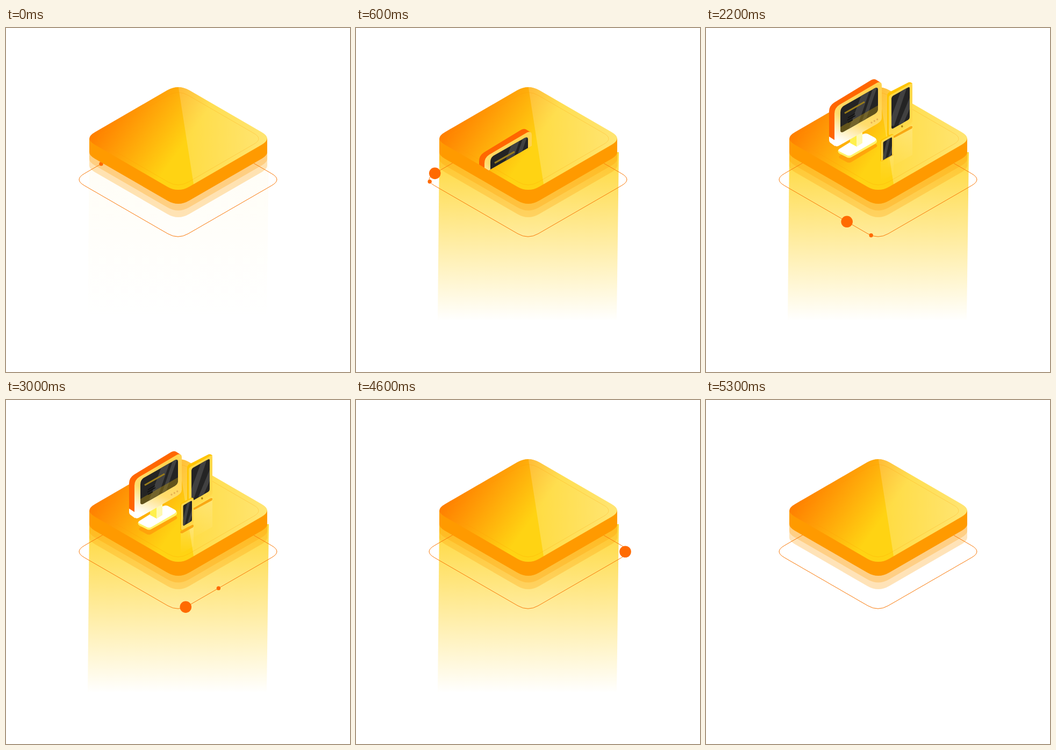
An HTML page for the animation above (5.5 s loop, 640 by 640 pixels).

```html
<!DOCTYPE html>
<html lang="en">
<head>
<meta charset="utf-8">
<title>Devices on a platform</title>
<style>
html, body { margin: 0; width: 100%; height: 100%; overflow: hidden; background: #fff; }
svg { display: block; width: 100vw; height: 100vh; }
</style>
</head>
<body>
<svg viewBox="0 0 640 640" xmlns="http://www.w3.org/2000/svg">
  <defs>
    <linearGradient id="glowFill" gradientUnits="userSpaceOnUse" x1="0" y1="231" x2="0" y2="545">
      <stop offset="0" stop-color="#ffd83a"/>
      <stop offset="1" stop-color="#ffd83a" stop-opacity="0"/>
    </linearGradient>
    <linearGradient id="topFill" gradientUnits="userSpaceOnUse" x1="190" y1="160" x2="310" y2="245">
      <stop offset="0" stop-color="#ff8000"/>
      <stop offset="1" stop-color="#ffd313"/>
    </linearGradient>
    <linearGradient id="shineFill" gradientUnits="userSpaceOnUse" x1="325" y1="0" x2="480" y2="0">
      <stop offset="0" stop-color="#fff" stop-opacity=".19"/>
      <stop offset="1" stop-color="#fff" stop-opacity=".4"/>
    </linearGradient>
    <linearGradient id="frameFill" gradientUnits="userSpaceOnUse" x1="300" y1="120" x2="262" y2="216">
      <stop offset="0" stop-color="#ffd350"/>
      <stop offset=".55" stop-color="#ffdc6c"/>
      <stop offset="1" stop-color="#fff"/>
    </linearGradient>
    <linearGradient id="mirrorFill" x1="0" y1="0" x2="0" y2="1">
      <stop offset="0" stop-color="#fff" stop-opacity=".2"/>
      <stop offset="1" stop-color="#fff" stop-opacity="0"/>
    </linearGradient>
    <clipPath id="topClip"><path class="top"/></clipPath>
    <clipPath id="monitorClip"><path d="M200 60H350V206L247 265 229 254H200Z"/></clipPath>
    <clipPath id="tabletClip"><path d="M330 70H390V175L337 204H330Z"/></clipPath>
    <clipPath id="phoneClip"><path d="M318 160H356V231L325 248H318Z"/></clipPath>
    <clipPath id="monitorGlass"><path id="glassM" d="M250 157Q250 149 256 145L314 112Q320 109 320 115V151Q320 156 314 160L256 193Q250 196 250 190Z"/></clipPath>
    <clipPath id="tabletGlass"><path id="glassT" d="M345 131Q345 128 348 126L376 110.500Q379 109 379 112V166Q379 169 376 171L348 187Q345 188 345 185Z"/></clipPath>
    <clipPath id="phoneGlass"><path id="glassP" d="M329.500 198Q329.500 196 331.500 195L344 188Q346 187 346 189V223Q346 225 344 226L331.500 233.500Q329.500 234.500 329.500 232Z"/></clipPath>
    <path id="body" d="M155 205.500V231Q155 237 165 243L300 321Q320.500 333 341 321L476 243Q486 237 486 231V205.500L320 130Z"/>
  </defs>

  <path id="glow" d="M155 231H489L485 545H152Z" fill="url(#glowFill)"/>
  <g fill="#f90">
    <use href="#body" y="25" opacity=".28"/>
    <use href="#body" y="12.500" opacity=".28"/>
  </g>
  <path id="ring" fill="none" stroke="#f97a0a"/>
  <circle id="small" r="3.700" fill="#ff6a00"/>
  <circle id="big" r="10.800" fill="#ff6a00"/>

  <use href="#body" fill="#ff9a00"/>
  <path class="top" fill="url(#topFill)"/>
  <path d="M320 105L350.500 300 500 215V190Z" fill="url(#shineFill)" clip-path="url(#topClip)"/>
  <path id="inner" fill="none" stroke="#f90" stroke-width=".8" opacity=".35"/>

  <g id="tabletBase">
    <path d="M338 206L384 180V236L338 262Z" fill="url(#mirrorFill)"/>
    <path d="M347 202L380 183Q384 181 384 184T381 188L353 203Q347 206 347 202Z" fill="#f9a813"/>
  </g>
  <g clip-path="url(#tabletClip)"><g id="tablet">
    <path d="M337 125Q337 122 340 120L377 101Q380 100 384 103L360 150 345 202Q337 205 337 198Z" fill="#ffc400"/>
    <path d="M340 130Q340 126 344 124L380 104Q384 102 384 106V172Q384 176 380 178L345 198Q340 201 340 196Z" fill="#ffd84a"/>
    <use href="#glassT" fill="#242424"/>
    <path d="M363 116L374 110 350 182H339ZM381 125V146L366 180H358Z" fill="#414141" clip-path="url(#tabletGlass)"/>
    <ellipse cx="364.800" cy="183" rx="1.700" ry="2" fill="#a8800c"/>
  </g></g>

  <g id="monitorBase">
    <path d="M248 238L298 208 316 216Q321 219 316 222L271 249Q266 252 261 249L250 243Q246 241 248 238Z" fill="#ff9d0a" opacity=".8"/>
  </g>
  <g clip-path="url(#monitorClip)"><g id="monitor">
    <path d="M248 226L291 199Q296 196 301 198L314 205Q318 207 318 209V212Q317 214 314 216L271 240Q266 243 261 240L249 234Q245 232 245.500 228Z" fill="#fff36a"/>
    <path d="M248 225L291 198Q296 195 301 197L314 204Q319 207 314 211L271 236Q266 239 261 236L249 230Q244 228 248 225Z" fill="#fff"/>
    <path d="M268 200L281 196V221L268 214Z" fill="#fff04d"/>
    <path d="M280 196L291 188V214L280 221Z" fill="#fff9b0"/>
    <path d="M229 155Q229 145 238 139L307 97Q312 94 316 96L324 101 260 150 241 220 232 212Q229 210 229 207Z" fill="#f60"/>
    <path d="M229 202L240 209V220L232 214Q229 212 229 208Z" fill="#fff"/>
    <path d="M239 159Q239 149 248 143L318 102Q327 98 327 107V167Q327 173 319 178L249 218Q239 224 239 214Z" fill="url(#frameFill)"/>
    <use href="#glassM" fill="#242424"/>
    <g clip-path="url(#monitorGlass)">
      <path d="M291 120L306 112 281 185 263 195ZM312 108H319L297 172 290 174Z" fill="#414141"/>
      <path d="M245 187L325 141V165L245 205Z" fill="#b8930f" opacity=".42"/>
      <path d="M258 158.500L295 137.500" stroke="#9a7d1a" stroke-width="3"/>
      <path d="M264 167L277 159.500M263 171.500L278 163M264 176L273 171" stroke="#111" stroke-width="1.500"/>
    </g>
    <g fill="#e8b050">
      <circle cx="308" cy="176" r="1.700"/><circle cx="313.300" cy="173" r="1.700"/><circle cx="318.700" cy="170" r="1.700"/>
    </g>
  </g></g>

  <g id="phoneBase">
    <path d="M325 248L349 235V272L325 286Z" fill="url(#mirrorFill)"/>
    <path d="M325 244L346 232.500Q349 231 349 234T346 238L329 247.500Q325 249 324 246Z" fill="#f9a813"/>
  </g>
  <g clip-path="url(#phoneClip)"><g id="phone">
    <path d="M324 196Q324 193 327 191L344 182Q347 181 349 183L338 215 327 243Q324 244 324 240Z" fill="#ffc400"/>
    <path d="M326 197Q326 194 329 192.500L346 183Q349 182 349 185V227Q349 230 346 231.500L329 241Q326 242 326 239Z" fill="#ffd84a"/>
    <use href="#glassP" fill="#242424"/>
    <path d="M338 188L343 186 332 236H326ZM347 200V212L341 230H337Z" fill="#414141" clip-path="url(#phoneGlass)"/>
  </g></g>
</svg>
<script>
const LOOP = 5500, STEP = 100;
const $ = id => document.getElementById(id);
const clamp = v => Math.max(0, Math.min(1, v));
const smooth = p => p * p * (3 - 2 * p);
const ramp = (t, a, b) => clamp((t - a) / (b - a));

// Flat diamond with rounded corners; a and b cut the end and side corners.
function diamond(cx, cy, w, h, a, b) {
  const k = h / w, q = (x, y) => `${cx + x} ${cy + y}`;
  return `M${q(-a, a * k - h)}Q${q(0, -h)} ${q(a, a * k - h)}` +
    `L${q(w - b, -b * k)}Q${q(w, 0)} ${q(w - b, b * k)}` +
    `L${q(a, h - a * k)}Q${q(0, h)} ${q(-a, h - a * k)}` +
    `L${q(b - w, b * k)}Q${q(-w, 0)} ${q(b - w, -b * k)}Z`;
}

for (const el of document.querySelectorAll(".top"))
  el.setAttribute("d", diamond(320.5, 205.5, 175.5, 101.5, 20.5, 20.5));
$("inner").setAttribute("d", diamond(320.5, 206, 158, 91.5, 19, 17));
$("ring").setAttribute("d", diamond(320, 282, 193.5, 111.7, 19, 19.1));

// Visible part of the orbit; c is how far the side corners reach.
function orbit(c) {
  const p = document.createElementNS("http://www.w3.org/2000/svg", "path");
  p.setAttribute("d", `M229 222.800L145.600 271Q${320 - c} 282 145.600 293L301 382.700` +
    `Q320 393.700 339 382.700L494.400 293Q${320 + c} 282 494.400 271L411 222.800`);
  return p;
}

// Smooth curve through [time, value] keys.
function curve(keys, t) {
  const n = keys.length - 1;
  if (t <= keys[0][0]) return keys[0][1];
  if (t >= keys[n][0]) return keys[n][1];
  const i = keys.findIndex(k => k[0] > t) - 1;
  const slope = j => {
    const a = keys[Math.max(0, j - 1)], b = keys[Math.min(n, j + 1)];
    return (b[1] - a[1]) / (b[0] - a[0]);
  };
  const [t0, v0] = keys[i], [t1, v1] = keys[i + 1];
  const d = t1 - t0, p = (t - t0) / d, s = smooth(p);
  return v0 + (v1 - v0) * s + d * p * (1 - p) * ((1 - p) * slope(i) - p * slope(i + 1));
}

const dots = [
  { el: $("small"), path: orbit(193.5),
    keys: [[0, 60], [600, 115.5], [1400, 210.4], [2200, 313], [3800, 509.6], [4600, 612], [4900, 640]] },
  { el: $("big"), path: orbit(187.6),
    keys: [[0, 40], [600, 95], [1200, 125], [1400, 146], [2200, 257.4], [3000, 337],
           [3800, 452.6], [4600, 534.7], [4800, 546], [5300, 608]] }
];

const devices = [
  { id: "monitor", depth: 165, over: 19, start: 450, peak: 800, rest: 1000 },
  { id: "tablet", depth: 105, over: 9, start: 1225, peak: 1600, rest: 1800 },
  { id: "phone", depth: 62, over: 3, start: 2020, peak: 2300, rest: 2400 }
];

function sink(d, t) {
  if (t > 4200) return d.depth * smooth(ramp(t, 4200, 4600));
  if (t < d.peak) return d.depth - (d.depth + d.over) * smooth(ramp(t, d.start, d.peak));
  return -d.over * (1 - smooth(ramp(t, d.peak, d.rest)));
}

function draw(t) {
  $("glow").setAttribute("opacity", t < 4800 ? 0.05 + 0.95 * ramp(t, 0, 600) : 1 - ramp(t, 4800, 5300));
  for (const { el, path, keys } of dots) {
    const p = path.getPointAtLength(curve(keys, t));
    el.setAttribute("cx", p.x);
    el.setAttribute("cy", p.y);
  }
  for (const d of devices) {
    const y = sink(d, t);
    $(d.id).setAttribute("transform", `translate(0 ${y})`);
    $(d.id + "Base").setAttribute("opacity", clamp(1 - y / d.depth * 1.8));
  }
}

const begin = performance.now();
function tick() {
  const t = (performance.now() - begin) % LOOP;
  draw(Math.min(5300, Math.floor(t / STEP) * STEP));
  requestAnimationFrame(tick);
}
tick();
</script>
</body>
</html>
```
